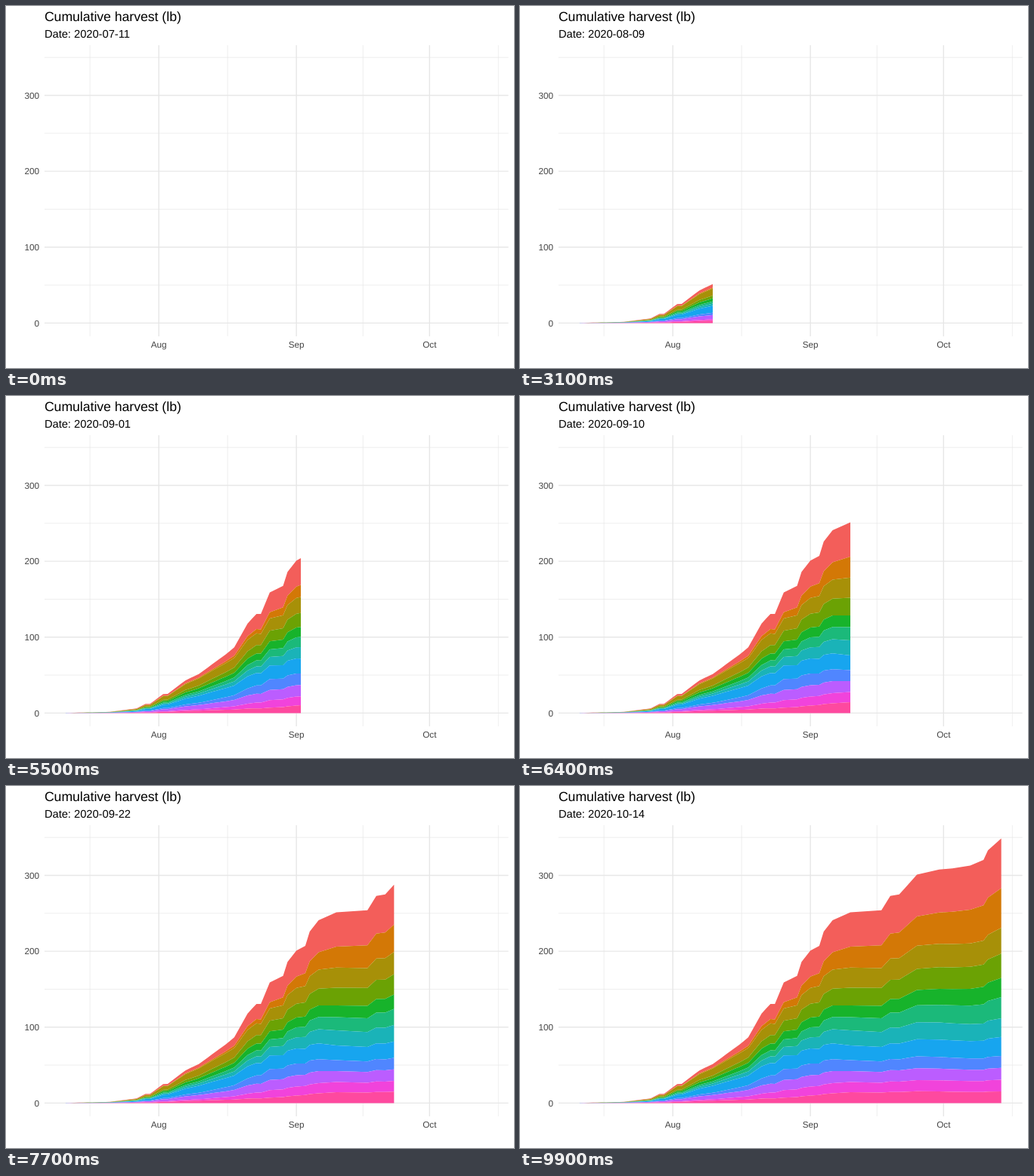
Recreate the animation shown at these times as an HTML page. Size 672x480 px, loop 10000 ms.

```html
<!DOCTYPE html>
<html lang="en">
<head>
<meta charset="utf-8">
<title>Cumulative harvest</title>
<style>
  html, body { margin: 0; width: 100%; height: 100%; overflow: hidden; background: #fff; }
  svg { display: block; font-family: "Liberation Sans", Arial, sans-serif; text-rendering: geometricPrecision; }
  .axis { font-size: 11.73px; fill: #444; }
</style>
</head>
<body>
<svg id="stage" width="672" height="480" viewBox="0 0 672 480">
  <g id="grid" stroke="#e7e7e7"></g>
  <g id="areas"></g>
  <g id="labels" class="axis"></g>
  <text x="50.9" y="20" font-size="17.6">Cumulative harvest (lb)</text>
  <text id="date" x="50.9" y="42" font-size="14.67"></text>
</svg>
<script>
const FRAMES = 100, STEP = 100, LAST_DAY = 95, DAILY_UNTIL = 46;
const START = Date.UTC(2020, 6, 11);
const COLORS = ["#f35e5a", "#d37806", "#a79008", "#6ba204", "#17b32b", "#1bb97a",
                "#1ab3b8", "#17a5ef", "#5086ff", "#bb5dff", "#f143db", "#fe499f"];

// Bends of the running total: [day, pounds]
const TOTAL = [
  [0, 0.1], [10, 1.6], [16, 6], [18, 12], [19, 12], [22, 25], [23, 25.3], [27, 43], [30, 51.3],
  [36, 77], [38, 86.5], [41, 118], [43, 130.5], [44, 130.7], [46, 159], [49, 167.5], [50, 186],
  [52, 201], [54, 207], [55, 226], [57, 241], [61, 251.3], [68, 254], [70, 273], [72, 274.8],
  [76, 301], [81, 307.8], [84, 309.3], [88, 313], [91, 320.5], [92, 333], [95, 348.7]
];

// Share of the total below each inner boundary, from top to bottom, on four days
const SHARES = [
  [30, [.908, .889, .706, .635, .555, .50, .444, .262, .205, .098, .062]],
  [46, [.835, .784, .682, .594, .527, .465, .395, .282, .192, .107, .044]],
  [61, [.82, .71, .605, .512, .45, .381, .302, .225, .168, .11, .057]],
  [95, [.812, .662, .565, .473, .4, .32, .25, .178, .133, .088, .044]]
];

const X = day => 78.8 + 5.872 * day;
const Y = pounds => 420.4 - 1.0063 * pounds;
const mix = (a, b, t) => a + (b - a) * t;

// Linear interpolation through [day, value] points, held at both ends
function along(points, day) {
  const i = points.findIndex(p => p[0] >= day);
  if (i < 0) return points[points.length - 1][1];
  if (i === 0) return points[0][1];
  const [p, v] = points[i - 1], [q, w] = points[i];
  return mix(v, w, (day - p) / (q - p));
}

const bounds = COLORS.slice(1).map((_, k) => SHARES.map(([day, row]) => [day, row[k]]));

function column(day) {
  const total = along(TOTAL, day);
  return {
    day,
    frame: Math.round(day * (FRAMES - 1) / LAST_DAY),
    stack: [total, ...bounds.map(b => total * along(b, day)), 0]
  };
}

// Harvested daily at first, later only on the bend days
const everyDay = Array.from({ length: DAILY_UNTIL + 1 }, (_, day) => day);
const laterDays = TOTAL.map(p => p[0]).filter(day => day > DAILY_UNTIL);
const columns = [...everyDay, ...laterDays].map(column);

function revealed(frame) {
  const shown = columns.filter(c => c.frame <= frame);
  const a = shown[shown.length - 1], b = columns[shown.length];
  if (b && a.frame < frame) {
    const t = (frame - a.frame) / (b.frame - a.frame);
    shown.push({ day: mix(a.day, b.day, t), stack: a.stack.map((v, k) => mix(v, b.stack[k], t)) });
  }
  return shown;
}

const $ = id => document.getElementById(id);
function add(parent, tag, attrs, text = "") {
  const el = document.createElementNS("http://www.w3.org/2000/svg", tag);
  for (const name in attrs) el.setAttribute(name, attrs[name]);
  el.textContent = text;
  return parent.appendChild(el);
}
const rule = (d, width) => add($("grid"), "path", { d, "stroke-width": width });
const across = (pounds, width) => rule(`M50.9 ${Y(pounds)}H664.6`, width);
const down = (day, width) => rule(`M${X(day)} 52V437.9`, width);

[50, 150, 250, 350].forEach(v => across(v, 0.71));
[5.5, 36.5, 67, 97.5].forEach(day => down(day, 0.71));
[0, 100, 200, 300].forEach(v => {
  across(v, 1.42);
  add($("labels"), "text", { x: 44, y: Y(v) + 4.2, "text-anchor": "end" }, v);
});
[["Aug", 21], ["Sep", 52], ["Oct", 82]].forEach(([name, day]) => {
  down(day, 1.42);
  add($("labels"), "text", { x: X(day), y: 453, "text-anchor": "middle" }, name);
});
const areas = COLORS.map(fill => add($("areas"), "path", { fill }));

function draw(frame) {
  const shown = frame ? revealed(frame) : [];
  const edge = k => shown.map(c => `${X(c.day).toFixed(2)} ${Y(c.stack[k]).toFixed(2)}`);
  areas.forEach((area, k) => area.setAttribute("d",
    shown.length ? `M${[...edge(k), ...edge(k + 1).reverse()].join("L")}Z` : ""));
  const day = Math.floor(LAST_DAY * frame / (FRAMES - 1));
  $("date").textContent = "Date: " + new Date(START + day * 864e5).toISOString().slice(0, 10);
}

let current = -1;
function tick() {
  const frame = Math.floor(performance.now() / STEP) % FRAMES;
  if (frame !== current) draw(current = frame);
  requestAnimationFrame(tick);
}
tick();
</script>
</body>
</html>
```
